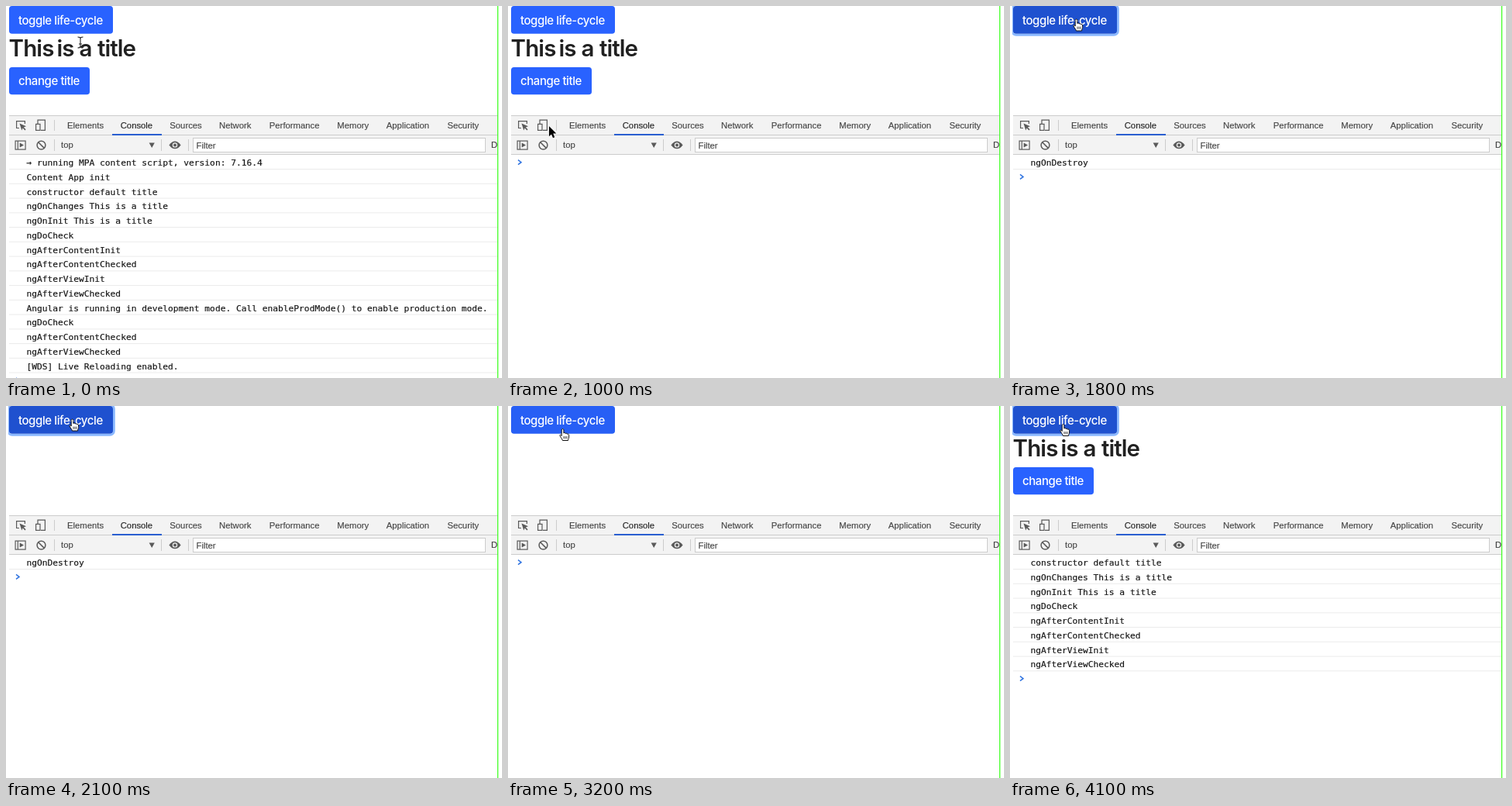
Animation, 640 px wide and 480 px high, one loop 4200 ms. Source, as an HTML page:

```html
<!DOCTYPE html>
<html lang="en">
<head>
<meta charset="utf-8">
<title>Life-cycle console</title>
<style>
html, body { margin: 0; width: 100%; height: 100%; overflow: hidden; background: #fff; }
svg { display: block; width: 640px; height: 480px; }
text { white-space: pre; }
.ui { font: 11.3px "Liberation Sans", Arial, sans-serif; fill: #444; stroke: #444; stroke-width: .15; }
.ui .on { fill: #222; stroke: #222; }
.log { font: 11.24px "DejaVu Sans Mono", monospace; fill: #1a1a1a; stroke: #1a1a1a; stroke-width: .2; }
.btn { font: 500 15px Inter, sans-serif; letter-spacing: -.4px; fill: #fff; }
.title { font: 600 29.5px Inter, sans-serif; letter-spacing: -.9px; font-optical-sizing: none; fill: #212121; }
.icon { fill: none; stroke: #5a5a5a; stroke-width: 1.2; }
.solid { fill: #5a5a5a; }
.rule { stroke: #ccc; fill: none; }
.prompt { fill: none; stroke: #2f73e0; stroke-width: 1.5; }
</style>
</head>
<body>
<svg viewBox="0 0 640 480">
  <clipPath id="page"><rect x="3" width="631" height="480"/></clipPath>

  <g clip-path="url(#page)">
    <rect id="ring" x="2.6" y="-1.4" width="136.8" height="38.8" rx="5.2" fill="none" stroke="#8ab8ff" stroke-width="2.8"/>
    <rect id="toggle" x="4" width="134" height="35.7" rx="3.8"/>
    <text class="btn" x="15.9" y="23.7">toggle life-cycle</text>

    <g id="content">
      <text class="title" y="65"><tspan x="3.6">This</tspan><tspan x="65.4">is</tspan><tspan x="94.6">a</tspan><tspan x="117.9">title</tspan></text>
      <rect id="change" x="4" y="79" width="104" height="35.3" rx="3.8"/>
      <text class="btn" x="15.9" y="102.3">change title</text>
    </g>

    <rect x="4" y="141" width="630" height="51" fill="#f3f3f3"/>
    <path class="rule" d="M4 141.5H634M4 166.5H634M4 191.5H634M62.5 147V161M62.5 172V187M200.5 172V187M235.5 172V187"/>
    <rect x="137" y="165" width="64" height="2" fill="#2a5fd0"/>

    <g class="icon">
      <path d="M17 157.5H13.6V148.6H24.4V152"/>
      <path d="M41 152V147.2H50.4V160.4H45"/>
      <rect x="38.6" y="152.4" width="5.4" height="8"/>
      <rect x="12.1" y="174.1" width="13" height="11"/>
      <path d="M15.3 174V185"/>
      <circle cx="45.5" cy="179.6" r="5.4" stroke-width="1.5"/>
      <path d="M41.7 175.8L49.3 183.4" stroke-width="1.5"/>
    </g>
    <g class="solid">
      <path d="M17.5 151.5L26 155.2L22.8 156.4L25.6 159.3L24.4 160.5L21.6 157.6L20.3 160.4Z"/>
      <path d="M17.7 176.6L23 179.6L17.7 182.6Z"/>
      <path d="M184.6 176.6H191.8L188.2 183Z"/>
      <path d="M210.4 179.4Q218 169.6 225.6 179.4Q218 189.2 210.4 179.4Z"/>
    </g>
    <circle cx="218" cy="179.4" r="3.2" fill="#f3f3f3"/>
    <circle cx="218" cy="179.4" r="2" class="solid"/>
    <rect class="rule" x="241.5" y="170.5" width="377" height="18" style="fill:#fff"/>

    <g class="ui">
      <text x="79" y="157.6">Elements</text>
      <text x="147.7" y="157.6" class="on">Console</text>
      <text x="211.3" y="157.6">Sources</text>
      <text x="275" y="157.6">Network</text>
      <text x="339.8" y="157.6">Performance</text>
      <text x="427.3" y="157.6">Memory</text>
      <text x="490.8" y="157.6">Application</text>
      <text x="569.4" y="157.6">Security</text>
      <text x="71" y="183.2">top</text>
      <text x="245.5" y="183.8">Filter</text>
      <text x="626" y="183.2">D</text>
    </g>

    <g id="console"></g>
    <path id="prompt" class="prompt" d="M13 -3L17 0L13 3"/>
  </g>

  <rect x="634" width="1.2" height="480" fill="#3cff1e"/>

  <g id="arrow">
    <path d="M0 0V13.2L3 10.4L5.1 15.2L7.3 14.2L5.3 9.5H9.4Z" fill="#000" stroke="#fff" stroke-width="1" paint-order="stroke"/>
  </g>
  <g id="hand" stroke="#111" stroke-width="1" stroke-linejoin="round">
    <path fill="#fff" d="M-1.8 9V1.4C-1.8 -.4 .9 -.4 .9 1.4V5.6C1.3 4.7 3.3 4.9 3.4 6.1C4 5.4 5.6 5.7 5.7 6.9C6.4 6.3 7.6 6.7 7.6 8V10.5C7.6 12.5 6.5 13 6.5 15H-.6C-.9 13 -3.2 11 -4 8.8C-4.3 7.2 -2.6 7.2 -1.8 9Z"/>
    <path d="M1 9.6V12.8M3 9.6V12.8M5 9.6V12.8" stroke-width=".8"/>
  </g>
  <g id="beam" fill="none" stroke="#222" stroke-width="1.1">
    <path d="M-3.5 -7Q0 -7 0 -5V5Q0 7 -3.5 7M3.5 -7Q0 -7 0 -5M3.5 7Q0 7 0 5M-2 2H2"/>
  </g>
</svg>
<script>
const LOOP = 4200, STEP = 100;
const CLEAR_1 = 900, DESTROY = 1700, CLEAR_2 = 2900, CREATE = 3500;
const BASE = [41, 98, 255], DARK = [31, 81, 207];
const $ = id => document.getElementById(id);

const checks = ["ngDoCheck", "ngAfterContentChecked", "ngAfterViewChecked"];
const created = [
  "constructor default title", "ngOnChanges This is a title", "ngOnInit This is a title",
  "ngDoCheck", "ngAfterContentInit", "ngAfterContentChecked", "ngAfterViewInit", "ngAfterViewChecked"
];
const booted = [
  "→ running MPA content script, version: 7.16.4", "Content App init", ...created,
  "Angular is running in development mode. Call enableProdMode() to enable production mode.",
  ...checks, "[WDS] Live Reloading enabled."
];

// Pointer path: time, x, y
const path = [
  [0, 96, 47], [100, 96, 47], [600, 58, 181], [800, 47, 180], [900, 47, 180],
  [1300, 85, 20], [1400, 86, 17], [2100, 86, 17], [2600, 44, 196], [2700, 44, 196],
  [2850, 46, 180], [2900, 46, 180], [3200, 71, 29.5], [3500, 69, 23.5], [4200, 69, 23.5]
];

function pointer(t) {
  const i = path.findIndex(p => p[0] > t);
  const [t0, x0, y0] = path[i - 1], [t1, x1, y1] = path[i];
  const k = (t - t0) / (t1 - t0), e = k * k * (3 - 2 * k);
  return [x0 + (x1 - x0) * e, y0 + (y1 - y0) * e];
}

const hasContent = t => t < DESTROY || t >= CREATE;
const hasFocus = t => (t >= DESTROY && t < CLEAR_2) || t >= CREATE;

function target(t) {
  const [x, y] = pointer(t);
  const inside = (l, top, r, b) => x >= l && x <= r && y >= top && y <= b;
  if (inside(4, 0, 138, 36)) return "toggle";
  if (!hasContent(t)) return "";
  if (inside(4, 79, 108, 114)) return "change";
  return inside(4, 40, 168, 72) ? "title" : "";
}

function logs(t) {
  if (t < CLEAR_1) return booted;
  if (t >= CREATE) return created;
  return t >= DESTROY && t < CLEAR_2 ? ["ngOnDestroy"] : [];
}

function fill(id, t) {
  const now = target(t) === id, before = t >= STEP && target(t - STEP) === id;
  const focused = id === "toggle" && hasFocus(t);
  const k = focused || (now && before) ? 1 : now ? .2 : 0;
  $(id).setAttribute("fill", `rgb(${BASE.map((c, i) => Math.round(c + (DARK[i] - c) * k))})`);
}

const show = (id, on) => $(id).style.display = on ? "" : "none";
const move = (id, x, y) => $(id).setAttribute("transform", `translate(${x} ${y})`);

let shown;
function printLogs(list) {
  if (list.join() === shown) return;
  shown = list.join();
  $("console").innerHTML = list.map((line, i) => {
    const y = 18.75 * i;
    return `<text class="log" x="26.4" y="${206.2 + y}">${line}</text>` +
      `<path d="M4 ${210.6 + y}H634" stroke="#ebebeb"/>`;
  }).join("");
  move("prompt", 0, 201.7 + 18.75 * list.length);
}

function draw(t) {
  const over = target(t), [x, y] = pointer(t);
  const cursor = over === "title" ? "beam" : over ? "hand" : "arrow";
  for (const id of ["arrow", "hand", "beam"]) show(id, id === cursor);
  move(cursor, x, y);
  show("content", hasContent(t));
  show("ring", hasFocus(t));
  fill("toggle", t);
  fill("change", t);
  printLogs(logs(t));
}

const start = performance.now();
function tick() {
  const t = (performance.now() - start) % LOOP;
  draw(Math.floor(t / STEP) * STEP);
  requestAnimationFrame(tick);
}
tick();
</script>
</body>
</html>
```
